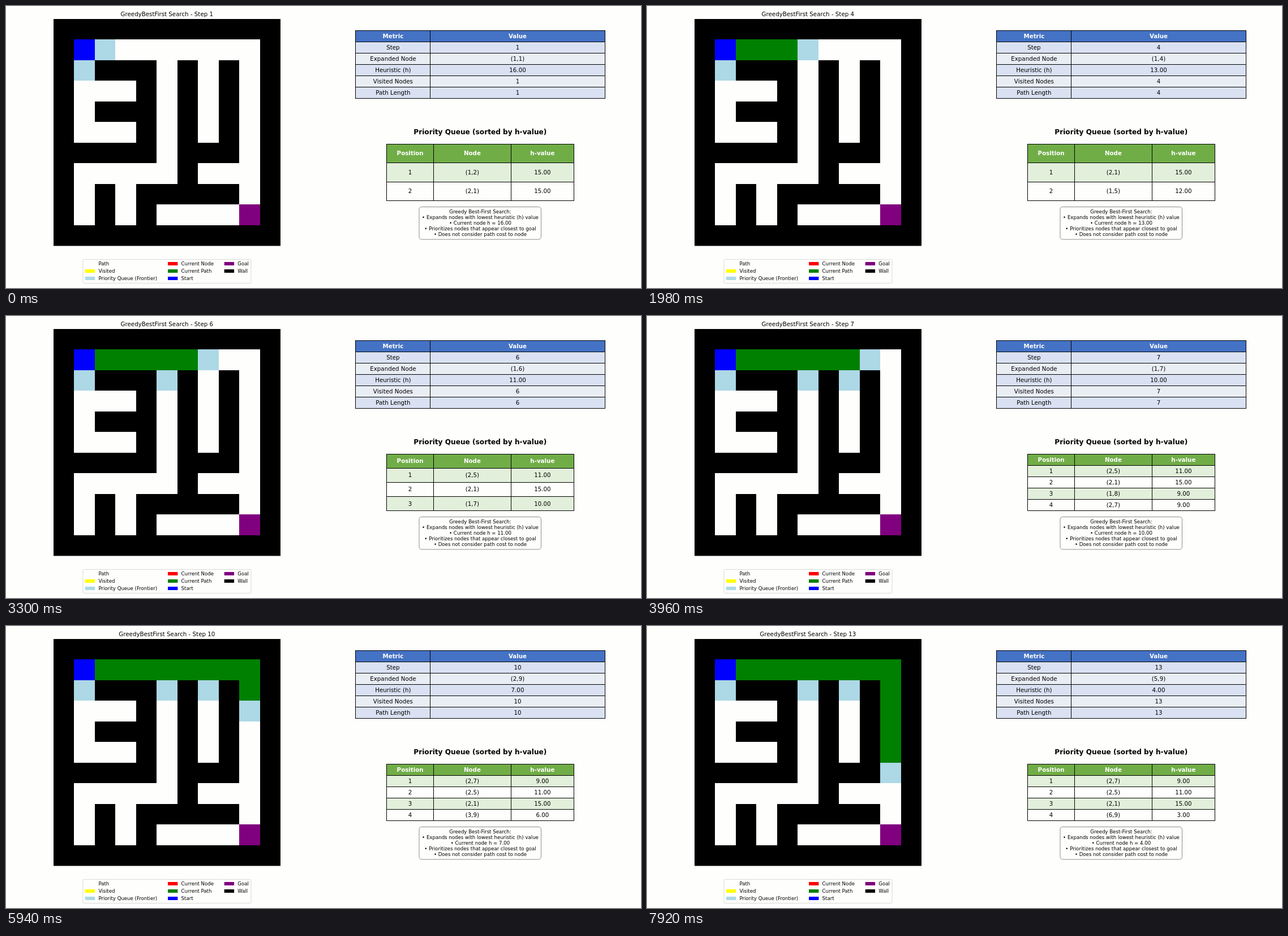
Write an HTML page with a canvas that moves like this. It is 1122 by 499 pixels and loops after 8 s.

```html
<!DOCTYPE html>
<html lang="en">
<head>
<meta charset="utf-8">
<title>Greedy best-first search</title>
<style>
  html, body { margin: 0; width: 100%; height: 100%; overflow: hidden; background: #fefefc; }
  canvas { display: block; }
</style>
</head>
<body>
<canvas id="stage" width="1122" height="499"></canvas>
<script>
const ctx = document.getElementById('stage').getContext('2d');
const LOOP_MS = 8000, STEP_MS = 660;
const PAPER = '#fefefc';
const COLORS = {
  wall: '#000', start: '#0000ff', goal: '#800080',
  path: '#008000', frontier: '#add8e6', visited: '#ffff00', current: '#ff0000'
};
const MAZE = [
  '###########',
  '#.........#',
  '#.###.#.#.#',
  '#...#.#.#.#',
  '#.###.#.#.#',
  '#...#.#.#.#',
  '#####.###.#',
  '#.....#...#',
  '#.#.#####.#',
  '#.#.#.....#',
  '###########'
];
const START = [1, 1], GOAL = [9, 9];
const DIRECTIONS = [[0, 1], [1, 0], [0, -1], [-1, 0]];

const heuristic = ([r, c]) => Math.abs(GOAL[0] - r) + Math.abs(GOAL[1] - c);
const nodeLabel = ([r, c]) => `(${r},${c})`;
const hLabel = node => heuristic(node).toFixed(2);

// Run the search once, keeping a snapshot after every expansion.
function search(count) {
  const steps = [], expanded = [], seen = new Set([String(START)]);
  let queue = [START];
  while (steps.length < count) {
    queue.sort((a, b) => heuristic(a) - heuristic(b));
    const node = queue.shift();
    expanded.push(node);
    for (const [dr, dc] of DIRECTIONS) {
      const next = [node[0] + dr, node[1] + dc];
      if (MAZE[next[0]][next[1]] === '#' || seen.has(String(next))) continue;
      seen.add(String(next));
      queue.push(next);
    }
    steps.push({ node, path: [...expanded], queue: [...queue] });
  }
  return steps;
}
const STEPS = search(Math.ceil(LOOP_MS / STEP_MS));

function text(str, x, y, size, { bold = false, color = '#000', align = 'center' } = {}) {
  ctx.font = `${bold ? 'bold ' : ''}${size}px "DejaVu Sans", sans-serif`;
  ctx.textAlign = align;
  ctx.fillStyle = color;
  ctx.fillText(str, x, y);
}

function rect(x, y, w, h, color) {
  ctx.fillStyle = color;
  ctx.fillRect(x, y, w, h);
}

function roundBox(x, y, w, h, radius, stroke, width) {
  ctx.beginPath();
  ctx.roundRect(x, y, w, h, radius);
  ctx.fillStyle = PAPER;
  ctx.fill();
  ctx.strokeStyle = stroke;
  ctx.lineWidth = width;
  ctx.stroke();
}

function cell([row, col], color) {
  const edge = i => Math.floor(i * 36.5);
  rect(84 + edge(col), 23 + edge(row), edge(col + 1) - edge(col), edge(row + 1) - edge(row), color);
}

function drawMaze({ path, queue }) {
  rect(84, 23, 401, 401.5, COLORS.wall);
  MAZE.forEach((line, r) => [...line].forEach((ch, c) => {
    if (ch === '.') cell([r, c], PAPER);
  }));
  queue.forEach(node => cell(node, COLORS.frontier));
  path.forEach(node => cell(node, COLORS.path));
  cell(START, COLORS.start);
  cell(GOAL, COLORS.goal);
}

function drawTable(rows, edges, top, bottom, headColor, bandColors) {
  const rowHeight = (bottom - top) / rows.length;
  const snap = v => Math.floor(v) + 0.5;
  ctx.lineWidth = 1;
  ctx.strokeStyle = '#000';
  rows.forEach((row, i) => row.forEach((label, j) => {
    const x = snap(edges[j]), y = snap(top + i * rowHeight);
    const w = snap(edges[j + 1]) - x, h = snap(top + (i + 1) * rowHeight) - y;
    rect(x, y, w, h, i ? bandColors[(i - 1) % 2] : headColor);
    ctx.strokeRect(x, y, w, h);
    const baseline = Math.round(top + (i + 0.5) * rowHeight + 3.5);
    text(label, (edges[j] + edges[j + 1]) / 2, baseline, 10.27,
      i ? {} : { bold: true, color: '#fff' });
  }));
}

function drawLegend() {
  roundBox(136, 448.5, 297, 42, 1.7, '#d5d5d3', 0.86);
  const columns = [
    [139.8, [['Path', PAPER], ['Visited', COLORS.visited], ['Priority Queue (Frontier)', COLORS.frontier]]],
    [286, [['Current Node', COLORS.current], ['Current Path', COLORS.path], ['Start', COLORS.start]]],
    [385.7, [['Goal', COLORS.goal], ['Wall', COLORS.wall]]]
  ];
  for (const [x, items] of columns) {
    items.forEach(([label, color], i) => {
      rect(x, 453 + 13 * i, 17.4, 6, color);
      text(label, x + 23.6, 459 + 13 * i, 8.58, { align: 'left' });
    });
  }
}

function drawNote(node) {
  roundBox(730, 355.5, 215.5, 57.5, 4.3, '#808080', 0.9);
  [
    'Greedy Best-First Search:',
    '• Expands nodes with lowest heuristic (h) value',
    `• Current node h = ${hLabel(node)}`,
    '• Prioritizes nodes that appear closest to goal',
    '• Does not consider path cost to node'
  ].forEach((line, i) => text(line, 838, 367 + 10 * i, 8.62));
}

function draw(index) {
  const step = STEPS[index], number = index + 1;
  rect(0, 0, 1122, 499, PAPER);
  text(`GreedyBestFirst Search - Step ${number}`, 284.3, 18, 10.27);
  drawMaze(step);
  drawLegend();
  drawTable([
    ['Metric', 'Value'],
    ['Step', number],
    ['Expanded Node', nodeLabel(step.node)],
    ['Heuristic (h)', hLabel(step.node)],
    ['Visited Nodes', step.path.length],
    ['Path Length', step.path.length]
  ], [617.9, 749.9, 1058.1], 43, 163.4, '#4472c4', ['#d9e1f2', '#e9edf4']);
  text('Priority Queue (sorted by h-value)', 837.8, 227, 12.15, { bold: true });
  drawTable([
    ['Position', 'Node', 'h-value'],
    ...step.queue.map((node, i) => [i + 1, nodeLabel(node), hLabel(node)])
  ], [672.8, 755.4, 892.5, 1003.2], 244.2, 344.6, '#70ad47', ['#e2efda', PAPER]);
  drawNote(step.node);
}

const origin = performance.now();
function tick() {
  const time = (performance.now() - origin) % LOOP_MS;
  draw(Math.floor(time / STEP_MS));
  requestAnimationFrame(tick);
}
tick();
</script>
</body>
</html>
```
